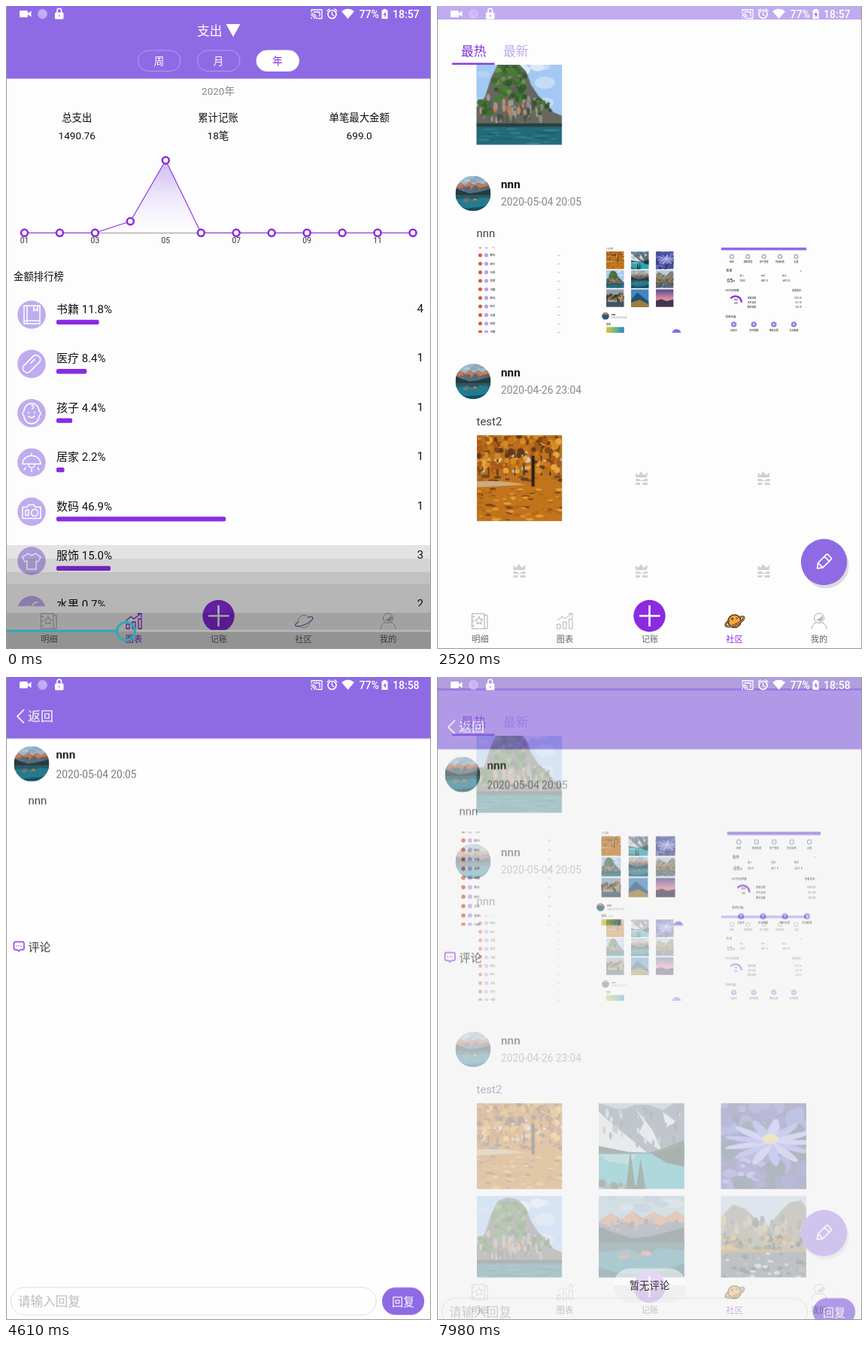
An HTML page that plays this animation: 565x854 px, repeating every 8000 ms.

```html
<!DOCTYPE html>
<html lang="zh-CN">
<head>
<meta charset="utf-8">
<style>
html, body { margin: 0; width: 100%; height: 100%; overflow: hidden; background: #fdfdfd; }
svg { display: block; }
#stage { width: 100vw; height: 100vh; font-family: Roboto, "Noto Sans CJK SC", "Noto Sans CJK", sans-serif; }
.mid { text-anchor: middle; }
.end { text-anchor: end; }
.line { fill: none; stroke-linecap: round; stroke-linejoin: round; }
</style>
</head>
<body>
<svg id="stage" viewBox="0 0 565 854"></svg>
<script>
const MAIN = '#8e6be5', DEEP = '#8a2be2', PALE = '#c0abf0', USER = 'nnn';
const LOOP = 8000;
let css = '', seed = 11;

// Every stop is [ms, value, easing]; a value holds until the next stop unless eased.
function anim(id, prop, stops) {
  const frames = stops.map(([t, v, ease]) =>
    `${t / LOOP * 100}%{${prop}:${v};animation-timing-function:${ease || 'step-end'}}`).join('');
  css += `@keyframes ${id}{${frames}}#${id}{animation:${id} ${LOOP}ms infinite step-end}`;
}
const appear = (id, t) => anim(id, 'opacity', [[0, 0], [t, 1]]);
const vanish = (id, t) => anim(id, 'opacity', [[0, 1], [t, 0]]);

const rnd = () => (seed = seed * 16807 % 2147483647) / 2147483647;
const list = (n, fn) => Array.from({ length: n }, (_, i) => fn(i)).join('');
const text = (x, y, s, size, fill = '#111', attr = '') =>
  `<text x="${x}" y="${y}" font-size="${size}" fill="${fill}" ${attr}>${s}</text>`;
const mid = (x, y, s, size, fill, attr = '') => text(x, y, s, size, fill, 'class="mid" ' + attr);
const rect = (x, y, w, h, fill, attr = '') =>
  `<rect x="${x}" y="${y}" width="${w}" height="${h}" fill="${fill}" ${attr}/>`;
const circle = (x, y, r, fill, attr = '') => `<circle cx="${x}" cy="${y}" r="${r}" fill="${fill}" ${attr}/>`;
const shape = (d, fill, attr = '') => `<path d="${d}" fill="${fill}" ${attr}/>`;
const line = (d, color, w = 1.2) => `<path class="line" d="${d}" stroke="${color}" stroke-width="${w}"/>`;
const group = (id, body, attr = '') => `<g id="${id}" ${attr}>${body}</g>`;
const at = (x, y, body, attr = '') => `<g transform="translate(${x} ${y})" ${attr}>${body}</g>`;
const symbol = (id, size, body) => `<symbol id="${id}" viewBox="0 0 ${size} ${size}">${body}</symbol>`;
const pic = (id, x, y, s) => `<use href="#${id}" x="${x}" y="${y}" width="${s}" height="${s}"/>`;
const avatar = (x, y) => at(x, y, pic('lake', -23.5, -23.5, 47), 'clip-path="url(#round)"');
// Scattered ellipses; tall stretches them vertically.
const dots = (n, x, y, w, h, r, colors, tall = 1) => list(n, () => {
  const size = r * (.5 + rnd());
  return `<ellipse cx="${(x + rnd() * w).toFixed(1)}" cy="${(y + rnd() * h).toFixed(1)}" rx="${size.toFixed(1)}" ry="${
    (size * tall).toFixed(1)}" fill="${colors[Math.floor(rnd() * colors.length)]}"/>`;
});
const fade = (id, ...colors) => `<linearGradient id="${id}" x2="0" y2="1">${colors.map((c, i) =>
  `<stop offset="${i / (colors.length - 1)}" stop-color="${c}"/>`).join('')}</linearGradient>`;

function photos() {
  const sky = c => rect(0, 0, 100, 100, c);
  return symbol('island', 100, sky('#a3c8f4') +
      dots(14, 0, 8, 100, 45, 8, ['#c4dcf6', '#dce9f8', '#b4d2f4'], .6) +
      shape('M0 78V56L10 44 17 22 25 6 36 2 48 4 58 14 64 30 72 42 82 52 90 62 100 66V78Z', '#66675f') +
      dots(50, 5, 48, 72, 24, 1.5, ['#8f8c84', '#4c504b', '#a19a8f', '#5b5b56'], 2.6) +
      dots(14, 8, 44, 50, 28, 1.8, ['#b98968', '#c2774d', '#a3968a'], 2) +
      dots(70, 21, 8, 36, 40, 2.6, ['#477d33', '#2f5b2b', '#649642', '#3c6a31', '#5c6152']) +
      dots(14, 4, 48, 12, 16, 2.6, ['#41722f', '#35602b']) + dots(18, 64, 48, 26, 18, 2, ['#4f7638', '#33532b']) +
      rect(0, 77, 100, 23, '#216b78') + rect(0, 75, 100, 4, '#29403f') +
      dots(26, 0, 81, 100, 18, 7, ['#2d7c87', '#1b5e6c', '#38858f'], .12)) +
    symbol('lake', 100, sky('#9ab8cb') + dots(9, 0, 0, 100, 14, 9, ['#b9c8d0', '#87a9c2'], .4) +
      shape('M0 30L14 20 27 28 40 18 52 27 64 19 78 26 90 18 100 24V60H0Z', '#5c6a77') +
      shape('M0 31L14 20 25 28 40 18 49 27 64 19 76 26 90 18 100 24V32L82 30 70 35 58 30 44 35 30 31 14 36Z', '#cc7955') +
      dots(26, 0, 28, 100, 12, 2, ['#7a7f83', '#4c5c67', '#b97a60'], 1.4) +
      shape('M0 36L18 43 40 50 62 47 82 42 100 37V62H0Z', '#243c40') +
      rect(0, 55, 100, 45, '#227b8f') + shape('M0 55H100V64L70 61 55 71 36 62 0 67Z', '#2a5862') +
      dots(12, 22, 65, 38, 9, 5, ['#9b7263', '#b07a62', '#5d747c'], .35) +
      shape('M0 84L30 92 75 88 100 79V100H0Z', '#164e62')) +
    symbol('autumn', 100, sky('#b7701f') +
      dots(14, 0, 20, 100, 24, 4, ['#cfc9b6', '#dcc795', '#b9b7a5']) +
      list(10, i => rect(3 + i * 10.3, 16, 1 + i % 3 * .5, 38, '#4d3521')) +
      dots(170, 0, 0, 100, 42, 2.8, ['#d88a22', '#a95a19', '#e8a63a', '#7f471c', '#cb7319', '#5f3a1c']) +
      rect(0, 47, 100, 53, '#c1741c') + dots(18, 0, 48, 100, 6, 4, ['#7c4a1e', '#a9651e', '#5f3d20'], .4) +
      shape('M0 54Q30 52 58 58L0 61Z', '#cdab7b') + rect(64.5, 24, 3.5, 36, '#2b1e17') +
      dots(90, 0, 62, 100, 37, 3.2, ['#d68c25', '#9b581b', '#e2a133', '#b2671a', '#80491b'], .35)) +
    symbol('peaks', 100, sky('#9bb4cd') + shape('M0 0L25 8 43 2H58L76 8 88 0H100V62H0Z', '#637183') +
      shape('M0 10L20 28 38 42 57 58H0Z M42 5L53 23 47 35 64 50 74 56 63 31Z M75 10L91 22 79 28Z', '#d5dae0') +
      dots(32, 0, 6, 95, 42, 1.6, ['#4f5e70', '#8b97a5', '#6a7687', '#b8c1ca'], 2.4) +
      shape('M0 50L35 57 58 58 75 53 100 43V72L66 70 0 60Z', '#29463f') +
      rect(0, 59, 100, 41, '#2ba5b1') + shape('M63 60L100 49V74L80 70Z', '#213a34') +
      shape('M0 60H45L35 72 10 68Z', '#75b9c3') + dots(12, 0, 91, 55, 9, 4, ['#314d3a', '#5a7265']) +
      shape('M37 56L43 100H32Z M49 64L55 100H44Z', '#23413a')) +
    symbol('flower', 100, sky('#454a86') +
      dots(60, 0, 0, 100, 100, 8, ['#4348a0', '#5f6cc8', '#2f4660', '#6a62bd', '#3c5668', '#4c50a8']) +
      dots(16, 0, 66, 50, 30, 6, ['#776ccf', '#8f85e2', '#544fa5'], .6) + shape('M59 50L64 100H61Z', '#3f3b57') +
      at(58, 46, list(13, i => `<ellipse cx="24" rx="22" ry="5" fill="${i % 2 ? '#8485e6' : '#a9a7f3'}" transform="scale(1.2 .6) rotate(${i * 27.7})"/>`) +
        `<ellipse cy="-4" rx="10" ry="6" fill="#cfc79a"/><ellipse cy="-6" rx="7" ry="4" fill="#e3cf62"/>`)) +
    symbol('canyon', 100, sky('#b9cde1') + shape('M0 25L14 10 28 15 42 28 56 35 68 20 80 8 94 5 100 14V65H0Z', '#858073') +
      dots(48, 0, 26, 100, 26, 2.2, ['#6a6b64', '#a69a83', '#bba56b', '#545a53'], 2) +
      dots(70, 0, 47, 100, 16, 2.5, ['#c48f34', '#4d5c39', '#2f4030', '#a26a2b', '#3d4a34']) +
      rect(0, 65, 100, 35, '#566774') +
      dots(60, 0, 67, 100, 32, 3, ['#45453c', '#8b7458', '#a9bccf', '#313937', '#6e6a58'], .6) + rect(0, 63, 100, 3, '#a8742f')) +
    symbol('grove', 100, sky('#8fa2b4') + dots(50, 0, 25, 100, 50, 6, ['#a66a28', '#34422f', '#5b4428']) + rect(0, 72, 100, 28, '#40545c')) +
    symbol('valley', 100, sky('#4586bd') + shape('M0 60L35 18 100 70V100H0Z', '#1f537a') + shape('M0 75L50 60 100 85V100H0Z', '#a07c36')) +
    symbol('dusk', 100, sky('url(#duskFill)') + shape('M0 65L30 56 60 67 100 58V100H0Z', '#403553'));
}

function shots() {
  const thumbs = ['autumn', 'peaks', 'flower', 'island', 'lake', 'canyon', 'grove', 'valley', 'dusk'];
  const kinds = ['书籍', '数码', '医疗', '水果', '居家'];
  return symbol('shotList', 113, list(11, i => {
      const y = -.8 + i * 11.3;
      return circle(5, y, 2.5, '#d9593c') + circle(13, y, 2.6, '#b7a3ed') +
        text(18, y + 1.4, kinds[i % 5], 3.4) + rect(107, y, 3.5, .7, '#aaa');
    })) +
    symbol('shotGrid', 113, text(10, 3, '九宫格', 3, '#444') +
      thumbs.map((id, i) => pic(id, 10 + i % 3 * 32.8, 5.5 + Math.floor(i / 3) * 25, 23.5)).join('') +
      circle(9, 91, 4.8, '#25606d') + shape('M4.5 89L9 86 13.5 89Z', '#d6815f') +
      text(17, 90, USER, 3, '#111', 'font-weight="700"') + text(17, 94.5, '2020-04-26 23:04', 2.6, '#888') +
      text(10, 103, '壁纸', 3) + rect(10, 105.5, 23.5, 8, 'url(#rainbow)') + circle(103, 114, 6, MAIN)) +
    symbol('shotHome', 113, rect(0, 0, 113, 4, MAIN) +
      ['账单', '预算管理', '资产管理', '种类标签', '设置'].map((s, i) =>
        rect(12 + i * 21.3, 10, 4.6, 4.6, 'none', 'stroke="#77718c" stroke-width=".9" rx="1"') + mid(14.3 + i * 21.3, 20.5, s, 2.9)).join('') +
      text(7, 32, '账单', 4) + text(105, 32, '›', 5) + text(8, 46, '05', 6.4) + text(15.5, 46, '月', 3.2) +
      ['收入', '支出', '结余'].map((s, i) => text(25 + i * 28, 38.5, s, 2.8) +
        text(25 + i * 28, 45, ['20.0', '451.5', '-431.5'][i], 3.6)).join('') +
      text(6, 58.5, '05月总预算', 3.5) + text(94, 58.5, '查看更多 ›', 3) +
      line('M13.5 67A8 8 0 0 1 27 72', DEEP, 2.4) + mid(20, 70, '剩余', 2.7) + mid(20, 75, '54%', 2.7) +
      ['预算总额', '本月支出', '剩余预算'].map((s, i) => text(35, 68 + i * 6.3, s, 2.9) +
        text(107, 68 + i * 6.3, ['1000.00', '451.50', '548.50'][i], 2.9, '#555', 'class="end"')).join('') +
      text(6, 93, '常用功能', 3.5) +
      ['记账本', '定时提醒', '换肤设置', '导出数据'].map((s, i) =>
        circle(17 + i * 26.5, 102, 3.7, '#9a7be8') + circle(17 + i * 26.5, 102, 1.4, '#ded3fa') + mid(17 + i * 26.5, 111, s, 3)).join(''));
}

function defs() {
  return `<defs>${fade('duskFill', '#4a4a91', '#d885a0', '#edac6c')}${fade('area', '#cbb8f3', '#eee8fc', '#fff')}
    <linearGradient id="rainbow"><stop stop-color="#e8c233"/><stop offset=".6" stop-color="#52b88d"/><stop offset="1" stop-color="#387bc6"/></linearGradient>
    <linearGradient id="toastFill" x2="0" y2="1"><stop offset=".5" stop-color="#fefefe"/><stop offset=".5" stop-color="#e9e9e9"/></linearGradient>
    <clipPath id="round"><circle r="23.5"/></clipPath>
    <clipPath id="feedBox"><rect y="78" width="565" height="719.5"/></clipPath>
    <clipPath id="rankBox"><rect y="96" width="565" height="701.5"/></clipPath>${photos()}${shots()}</defs>`;
}

function statusBar() {
  const w = '#fff';
  return rect(18, 6, 11, 9, w, 'rx="1.5"') + shape('M28 10.5L33.5 6.5V14.5Z', w) +
    circle(48.5, 10.5, 6.5, '#dacdf8', 'opacity=".65"') + circle(49.5, 9.5, 4, '#c6b3f3', 'opacity=".6"') +
    rect(65, 8.5, 11.5, 9, w, 'rx="1.5"') + line('M68 8.5V6a2.8 2.8 0 0 1 5.6 0V8.5', w, 1.6) + circle(70.8, 13, 1.3, PALE) +
    line('M406 7.5V5H420V16.5H414M406 15.5V16.5M406 12.5Q410 13 410 16.5M406 10Q412 10.5 412.5 16.5M409 8H417V13.5', w, 1.3) +
    circle(433.5, 11, 5.5, 'none', 'stroke="#fff" stroke-width="1.6"') + line('M433.5 8V11.5L436 13M427 6.5L430 4M440 6.5L437 4', w, 1.3) +
    shape('M446 7Q454.500 .5 463 7L454.500 17Z', w) + text(469.5, 15.5, '77%', 14, w, 'font-weight="500"') +
    shape('M499.500 5.500H501.500V4H505.500V5.500H507.500V17H499.500Z', w) + shape('M504.500 7L501.500 12H503.500V15.500L506 10.500H504Z', MAIN) +
    group('clockA', text(514, 15.5, '18:57', 14, w, 'font-weight="500"')) +
    group('clockB', text(514, 15.5, '18:58', 14, w, 'font-weight="500"'));
}

function nav(active) {
  const color = i => i === active ? DEEP : '#aaa';
  const labels = ['明细', '图表', '记账', '社区', '我的'];
  const planet = active === 3
    ? at(395.5, 817, circle(0, 0, 8.5, '#f0a93f', 'stroke="#54331d" stroke-width="1.6"') +
        circle(-3, -3, 1.8, '#8a4f22') + circle(3, -4, 1.2, '#8a4f22') +
        line('M-8 0C-18 8 -6 9 3 4C15 -2 15 -8 7 -5', '#54331d', 2.8) + line('M-8 0C-18 8 -6 9 3 4C15 -2 15 -8 7 -5', '#f4c35e', 1))
    : at(395.5, 817, line('M-7 -1A8 8 0 0 1 7 -5M8 2A8 8 0 0 1 -5 7', '#aaa', 1) +
        line('M-7 1C-17 8 -6 8 3 4C15 -2 15 -8 6 -5', '#7560bd', 1.3));
  return rect(0, 797.5, 565, 57, '#fdfdfd') +
    at(57, 817, line('M-10 -10H6V10H-10ZM6 -8H10V10H6M-10 -6H-7M-10 0H-7M-10 6H-7', color(0), 1) +
      line('M-1 -6L.6 -2.500 4 -2 1.500 .5 2 4 -1 2.300 -4 4 -3.500 .5 -6 -2 -2.600 -2.500Z', color(0), 1)) +
    at(170, 817, line('M-10 4H-6V10H-10ZM-2 1H2V10H-2ZM6 -3H10V10H6ZM-10 -1L-4 -6 0 -3 9 -10M5 -10H10V-5', color(1), active === 1 ? 1.3 : .9)) +
    circle(282.5, 810, 21.2, DEEP) + line('M270 810H295.500M282.500 797V823', '#fff', 2.6) + planet +
    at(508, 817, circle(0, -4, 6.5, 'none', `stroke="${color(4)}" stroke-width="1"`) +
      shape('M-4 -2Q2 -3 4 -8Q7 -2 1 1Z', '#bbb') + line('M-10 10Q-9 3 -4 2M4 2Q9 3 10 10', color(4), 1)) +
    labels.map((s, i) => mid([57.5, 170, 283, 395.5, 508][i], 845, s, 11.2, i === active ? DEEP : '#666',
      i === 3 && active === 3 ? 'id="tabLabel"' : '')).join('');
}

function chartPage() {
  const px = i => 24.5 + i * 46.95;
  const py = i => i === 3 ? 286 : i === 4 ? 205 : 301.3;
  const path = Array.from({ length: 12 }, (_, i) => `${px(i)} ${py(i)}`).join('L');
  const icons = [
    'M-10 -12H11V12H-10ZM-6 -12V12M-10 8H11M3 -12V-5L5.500 -7 8 -5V-12',
    'M-11 3L3 -11A6 6 0 0 1 11 -3L-3 11A6 6 0 0 1 -11 3M-1 -1L4 -6',
    'M-10 -3A10 10 0 0 1 10 -3Q14 0 10 4A10 10 0 0 1 -10 4Q-14 0 -10 -3M0 -11Q5 -9 1 -6M-4 -1V0M4 -1V0M-4 4Q0 8 4 4',
    'M0 -12V-9M-12 2A12 11 0 0 1 12 2ZM-4 3A4 4 0 0 0 4 3M-8 7L-10 10M0 9V12M8 7L10 10',
    'M-12 -6H-6L-4 -9H3L5 -6H12V9H-12ZM-8 -2V5H-4V-2ZM4 -3A4.500 4.500 0 1 0 4.100 -3',
    'M-5 -10Q0 -5 5 -10L12 -5 9 1 6 0V11H-6V0L-9 1 -12 -5Z',
    'M0 -4C-14 -10 -14 10 -3 11C8 12 8 -2 0 -4Q2 -10 8 -11M3 -3C14 -6 14 9 5 9'];
  const ranks = [['书籍', '11.8', 4], ['医疗', '8.4', 1], ['孩子', '4.4', 1], ['居家', '2.2', 1], ['数码', '46.9', 1], ['服饰', '15.0', 3], ['水果', '0.7', 2]];
  const row = ([name, pct, n], i) => at(0, i * 65.4,
    circle(34, 410, 18.8, '#bfacf0') + at(34, 410, line(icons[i], '#fff', 1.5)) +
    text(67, 408, `${name} ${pct}%`, 15) + rect(67, 416.7, pct * 4.8, 6.3, DEEP, 'rx="2"') + text(555, 407, n, 15, '#111', 'class="end"'));
  const pill = (x, s, on) => rect(x, 59, 56.5, 27.5, on ? '#fff' : 'none', `rx="13.7" stroke="${on ? '#fff' : '#b49cf0'}"`) +
    mid(x + 28, 78, s, 13.5, on ? DEEP : '#fff');
  return rect(0, 0, 565, 854, '#fdfdfd') + rect(0, 0, 565, 96.5, MAIN) +
    text(254, 38.5, '支出', 16.7, '#fff') + shape('M292.500 24H311.500L302 41Z', '#fff') +
    pill(175.5, '周') + pill(254.5, '月') + pill(333, '年', true) + mid(282, 118, '2020年', 13.5, '#888') +
    [['总支出', '1490.76'], ['累计记账', '18笔'], ['单笔最大金额', '699.0']].map(([a, b], i) =>
      mid(94.3 + i * 187.7, 153, a, 13.4) + mid(94.3 + i * 187.7, 177, b, 13.6)).join('') +
    shape('M118 301L165 286 212 205 259 301Z', 'url(#area)') + line('M24 301.500H541', '#999', 1) + line('M' + path, DEEP, 1.1) +
    list(12, i => circle(px(i), py(i), 4.5, '#fff', `stroke="${DEEP}" stroke-width="2.6"`) +
      (i % 2 ? '' : mid(px(i), 315, String(i + 1).padStart(2, '0'), 10.3, '#333'))) +
    text(10, 363.5, '金额排行榜', 13.4) + `<g clip-path="url(#rankBox)">${ranks.map(row).join('')}</g>` + nav(1);
}

function controls() {
  const bands = [[716, .1], [734, .16], [752, .23], [768, .28], [806, .36], [831, .42]];
  return bands.map(([y, a], i) => rect(0, y, 565, (bands[i + 1] || [854])[0] - y, '#000', `opacity="${a}"`)).join('') +
    line('M171 830H565', '#b9b9b9', 2.5) + line('M0 830H147', '#2aabb4', 3) +
    circle(159.5, 830.5, 12, 'none', 'stroke="#2aabb4" stroke-width="3"');
}

function feedPage() {
  const cols = [52.5, 215, 377.5];
  const dates = ['2020-05-05 09:05', '2020-05-05 09:05', '2020-05-04 20:05', '2020-04-26 23:04'];
  const crown = shape('M-8 -1L-8 -7 -4 -4 -1 -9 3 -4 8 -8 7 -1ZM-8 1H-3L-1 3H2L4 1H8V4H-8ZM-8 6H-2V9H-8ZM1 6H8V9H1Z', '#d0d0d0');
  const cell = (id, i) => {
    const x = cols[i % 3], y = 197 + Math.floor(i / 3) * 123;
    const load = [2460, 2800, 2930, 3040, 3150, 3310][i];
    vanish('wait' + i, load);
    appear('photo' + i, load);
    return group('wait' + i, at(x + 57, y + 57, crown)) + group('photo' + i, pic(id, x, y, 113.5));
  };
  const contents = [
    pic('island', 52.5, 197, 113.5), pic('island', 52.5, 197, 113.5),
    ['shotList', 'shotGrid', 'shotHome'].map((id, i) => pic(id, cols[i], 197, 113.5)).join(''),
    ['autumn', 'peaks', 'flower', 'island', 'lake', 'canyon'].map(cell).join('')];
  const post = (body, i) => at(0, i * 249.7, avatar(48, 125.5) +
    text(85, 118.5, USER, 15.3, '#111', 'font-weight="700"') + text(85, 142, dates[i], 13.75, '#888') +
    text(52.5, 184, ['qqq', 'qqq', USER, 'test2'][i], 15, '#444') + `<g class="media">${body}</g>`);
  return rect(0, 0, 565, 854, '#fdfdfd') +
    `<g clip-path="url(#feedBox)">${group('feed', contents.map(post).join(''))}</g>` +
    rect(0, 0, 565, 18, PALE) + text(32, 66, '最热', 16.7, '#8431d8') + text(88, 66, '最新', 16.7, PALE) +
    rect(20, 75.5, 56.5, 2.5, '#8640d9') + nav(3) +
    circle(517, 743, 30.5, '#dcdcdc') + circle(514.5, 738.5, 30.7, MAIN) +
    `<g transform="translate(514 738.5) rotate(45)">${line('M-4.500 -9a2 2 0 0 1 2-2h5a2 2 0 0 1 2 2V6L0 12L-4.500 6ZM-4.500 -6H4.500M-4.500 6H4.500', '#fff', 1.7)}</g>`;
}

function detailPage() {
  return rect(0, 0, 565, 854, '#fefefe') + rect(0, 0, 565, 81.5, MAIN) +
    line('M23.500 43.500L15 52 23.500 60.500', '#fff', 1.7) + text(29, 58, '返回', 17, '#fff') +
    avatar(34, 115) + text(66.5, 108, USER, 15.3, '#222', 'font-weight="700"') +
    text(66.5, 134, '2020-05-04 20:05', 13.75, '#777') + text(29.5, 168.5, USER, 15, '#444') +
    group('detailShots', ['shotList', 'shotGrid', 'shotHome'].map((id, i) => pic(id, 29.5 + i * 178, 191, 124.5)).join('')) +
    line('M12.500 351.500H22a2 2 0 0 1 2 2V360a2 2 0 0 1 -2 2H19L17 364 15 362H12.500a2 2 0 0 1 -2 -2V353.500a2 2 0 0 1 2 -2M14 357H14.100M17 357H17.100M20 357H20.100', DEEP, 1.4) +
    text(29.5, 364, '评论', 15, '#333', 'font-weight="500"') +
    rect(6.500, 810.5, 485.5, 36.5, '#fefefe', 'rx="18" stroke="#ddd"') + text(16, 835, '请输入回复', 16.6, '#bbb') +
    rect(500, 810.5, 56, 36.5, MAIN, 'rx="18"') + mid(528, 835, '回复', 15, '#fff');
}

document.getElementById('stage').innerHTML = defs() +
  group('community', feedPage()) + group('charts', chartPage()) + group('controls', controls()) +
  group('scrim', rect(0, 0, 565, 854, '#000')) +
  group('detailFade', group('detailMove', detailPage())) +
  group('toast', rect(234.5, 785.5, 96.5, 45.5, 'url(#toastFill)', 'id="toastBox" rx="22"') + mid(282.5, 813, '暂无评论', 13.4, '#333')) +
  statusBar() + line('M.5 0V853.500H564.500V0', '#999', 1);

vanish('charts', 480);
anim('controls', 'opacity', [[0, 1], [60, 1, 'linear'], [400, 0]]);
anim('tabLabel', 'font-weight', [[0, 700], [1470, 400]]);
css += '@keyframes media{0%{opacity:0}8.5%{opacity:1}}.media{animation:media 8s infinite step-end}';
anim('feed', 'transform', [[0, 0], [1900, 40], [2080, 140], [2135, 235], [2190, 305], [2245, 350], [2300, 376], [2710, 380]]
  .map(([t, y]) => [t, `translateY(${-y}px)`]));
vanish('clockA', 2710);
appear('clockB', 2710);
anim('detailFade', 'opacity', [[0, 0], [4390, .3], [4450, .85, 'ease-out'], [4590, 1], [7930, 1, 'linear'], [7980, .63]]);
anim('detailMove', 'transform', [[0, 'translateY(57px)'], [4390, 'translateY(57px)'], [4450, 'translateY(18px)', 'cubic-bezier(.16,1,.3,1)'],
  [4730, 'translateY(0)'], [7830, 'translateY(0)', 'cubic-bezier(.32,0,.67,0)'], [7980, 'translateY(14.5px)']]);
appear('detailShots', 4720);
anim('toast', 'opacity', [[0, 0], [4750, 0, 'linear'], [4980, 1]]);
anim('toastBox', 'fill-opacity', [[0, 1], [7830, .6]]);
anim('toastBox', 'fill', [[0, 'url(#toastFill)']]);
css += '#toastBox{animation:toastBox 8s infinite step-end,toastSoft 8s infinite step-end}' +
  '@keyframes toastSoft{0%{fill-opacity:1}97.9%{fill-opacity:.5}}';
anim('scrim', 'opacity', [[0, 0], [7800, .08]]);

const style = document.createElement('style');
style.textContent = css;
document.head.append(style);
</script>
</body>
</html>
```
